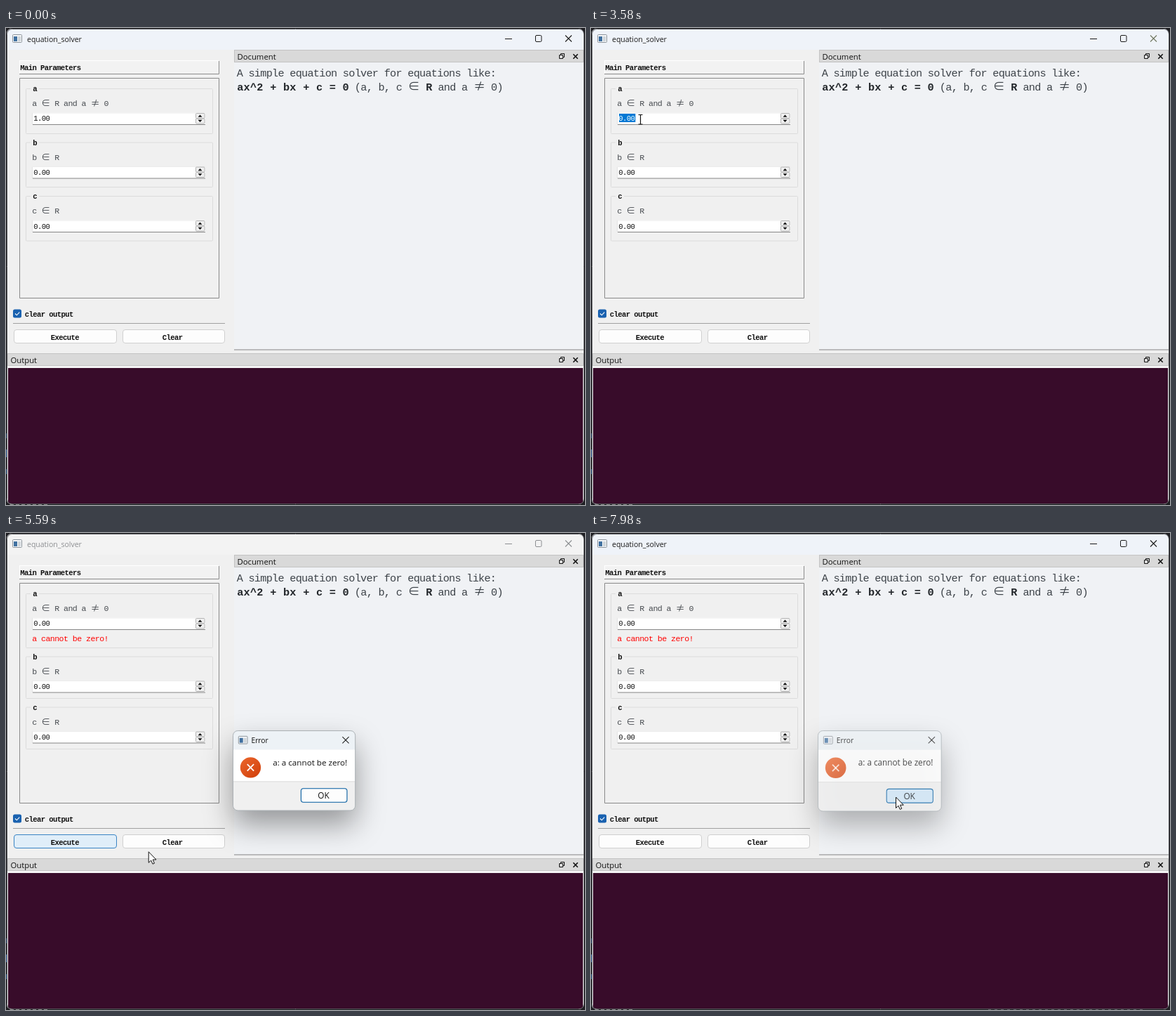
Animation of 825x679 px, one loop 8 s. Source, as an HTML page with a canvas:

```html
<!DOCTYPE html>
<html lang="en">
<head>
<meta charset="utf-8">
<title>equation_solver</title>
<style>
html, body { margin: 0; width: 100%; height: 100%; overflow: hidden; background: #1e1e22; }
canvas { display: block; }
</style>
</head>
<body>
<canvas id="stage" width="825" height="679"></canvas>
<script>
const ctx = document.getElementById('stage').getContext('2d');
const LOOP = 8000, TICK = 68.2;
const MONO = '"Liberation Mono", monospace';
const WIDE = '"Noto Sans CJK SC", "Noto Sans CJK JP", "DejaVu Sans", sans-serif';
const SANS = '"Open Sans", "Noto Sans", sans-serif';
const INK = '#111', LABEL = '#474b50', BLUE = '#0078d4';

// Pointer stops: time, x, y
const PATH = [
  [70, 215, 600], [400, 195, 328], [510, 178, 265], [820, 70, 130],
  [4170, 70, 130], [4540, 88, 290], [4920, 110, 445],
  [5450, 110, 445], [5590, 203, 454], [5930, 236, 423],
  [6200, 320, 401], [6480, 410, 376], [6750, 452, 371], [6820, 434.5, 376]
];

const CLICKS = [[885, 1035], [1095, 1295], [1360, 1490], [5175, 5445], [7015, 7905]];

const within = (t, a, b) => t >= a && t < b;
const clamp = v => Math.max(0, Math.min(1, v));

function fill(x, y, w, h, color) {
  ctx.fillStyle = color;
  ctx.fillRect(x, y, w, h);
}

function box(x, y, w, h, r, bg, edge, lw = 1) {
  ctx.beginPath();
  ctx.roundRect(x, y, w, h, r);
  if (bg) { ctx.fillStyle = bg; ctx.fill(); }
  if (edge) { ctx.strokeStyle = edge; ctx.lineWidth = lw; ctx.stroke(); }
}

function line(points, color, lw = 1) {
  ctx.beginPath();
  for (let i = 0; i < points.length; i += 2) ctx.lineTo(points[i], points[i + 1]);
  ctx.strokeStyle = color;
  ctx.lineWidth = lw;
  ctx.stroke();
}

function poly(points, color) {
  ctx.beginPath();
  for (let i = 0; i < points.length; i += 2) ctx.lineTo(points[i], points[i + 1]);
  ctx.closePath();
  ctx.fillStyle = color;
  ctx.fill();
}

function cross(x, y, r, color, lw) {
  line([x - r, y - r, x + r, y + r], color, lw);
  line([x - r, y + r, x + r, y - r], color, lw);
}

function sans(text, x, y, size, color) {
  ctx.font = `${size}px ${SANS}`;
  ctx.textAlign = 'left';
  ctx.fillStyle = color;
  ctx.fillText(text, x, y);
}

// Fixed-pitch text; math signs take two cells. Returns the end x.
function mono(text, x, y, size, pitch, color, weight = 'normal') {
  ctx.textAlign = 'center';
  ctx.fillStyle = color;
  for (const ch of text) {
    const wide = ch > '\u00ff';
    const w = wide ? pitch * 2 : pitch;
    ctx.font = wide ? `300 ${w}px ${WIDE}` : `${weight} ${size}px ${MONO}`;
    ctx.fillText(ch, x + w / 2, y);
    x += w;
  }
  return x;
}

const small = (text, x, y, color = INK, weight) => mono(text, x, y, 10.6, 5.75, color, weight);
const heading = (text, x, y) => small(text, x, y, INK, 'bold');
const label = (text, x, y, color = LABEL) => mono(text, x, y, 11.6, 6.4, color);

function appIcon(x, y) {
  box(x + .5, y + .5, 13, 11, 1, '#f4f6f8', '#8d949b');
  fill(x + 2, y + 3, 5, 7, '#3f6f9f');
  fill(x + 8, y + 3, 4, 7, '#cfd5da');
}

function desktop(t) {
  fill(0, 0, 825, 679, '#1e1e22');
  fill(0, 577, 2, 7, '#3c5a80');
  fill(0, 600, 2, 11, '#5480bd');
  fill(0, 628, 2, 7, '#3c6a9c');
  for (let x = 6; x < 62; x += 8) fill(x, 678, 5, 1, '#858585');
  if (t > 5930) for (let x = 566; x < 790; x += 9) fill(x, 678, 4, 1, '#5b5560');
}

function titleBar(t) {
  const idle = within(t, 5500, 7905);
  const ink = idle ? '#8d8f92' : '#1a1a1a';
  const closeInk = idle ? ink : within(t, 70, 5500) ? '#6f755f' : ink;
  fill(1, 1, 822, 30, idle ? '#f3f3f3' : '#eff3f9');
  appIcon(9, 9);
  sans('equation_solver', 30, 20, 10.5, ink);
  line([711, 15.5, 721, 15.5], ink);
  box(754.5, 10.5, 8.5, 9, 1.5, null, ink);
  cross(801.5, 15, 4.5, closeInk, 1.1);
}

function dockTitle(text, x, y, w) {
  fill(x, y, w, 18, '#d9d9d9');
  ctx.strokeStyle = '#c3c3c3';
  ctx.lineWidth = 1;
  ctx.strokeRect(x + .5, y + .5, w - 1, 17);
  sans(text, x + 4.5, y + 14, 11.3, INK);
  box(790.5, y + 5.5, 5, 5, 0, null, INK);
  box(788.5, y + 7.5, 5, 5, 0, '#d9d9d9', INK);
  cross(811.5, y + 9.5, 3.2, INK, 1.6);
}

function documentPane() {
  dockTitle('Document', 325, 31, 498);
  fill(325, 49, 498, 409, '#f0f2f5');
  fill(325, 457.5, 498, 1, '#858585');
  const ink = '#3c4248';
  const text = (s, x, y) => mono(s, x, y, 15.2, 8.4, ink);
  const bold = (s, x, y) => mono(s, x, y, 15.2, 9.4, '#22262a', 'bold');
  text('A simple equation solver for equations like:', 329, 69);
  let x = bold('ax^2 + bx + c = 0', 329, 89);
  x = text(' (a, b, c ∈ ', x, 89);
  x = bold('R', x, 89);
  text(' and a ≠ 0)', x, 89);
}

function spinBox(y, edge) {
  fill(37, y, 247, 17, '#fff');
  line([37.5, y, 37.5, y + 17], '#e2e2e2');
  line([37, y + .5, 284, y + .5], '#ececec');
  fill(38, y + 16.5, 246, 1, edge);
  for (const top of [y + .5, y + 8]) box(270.5, top + .5, 12.5, 7, 1, '#f0f0f0', '#b4b4b4');
  poly([273.5, y + 6.3, 279.5, y + 6.3, 276.5, y + 3], INK);
  poly([273.5, y + 10.2, 279.5, y + 10.2, 276.5, y + 13.5], INK);
}

function group(name, hint, y, h, edge = '#868686') {
  box(28.5, y - .5, 266, h, 1, null, '#dcdcdc');
  fill(35, y - 3, 12, 6, '#f0f0f0');
  heading(name, 38.5, y + 3);
  label(hint, 37.5, y + 24);
  spinBox(y + 33.5, edge);
}

const value = (text, y, color) => small(text, 39.5, y, color);

function select(from) {
  fill(from, 122, 63.3 - from, 12, BLUE);
}

function firstValue(t) {
  if (within(t, 1150, 1360)) {
    select(51.5);
    value('1.', 132);
    small('00', 51, 132, '#fff');
  } else if (within(t, 1360, 2225)) {
    select(40);
    value('1.00', 132, '#fff');
    if (t < 2025) fill(63, 122, 1, 12, INK);
  } else if (within(t, 2225, 3575)) {
    value('0', 132);
    if (t < 2755 || t >= 3305) fill(46, 122, 1, 12, INK);
  } else if (within(t, 3575, 5175)) {
    select(40);
    value('0.00', 132, '#fff');
  } else {
    value(t < 2000 ? '1.00' : '0.00', 132);
  }
}

function button(text, x, w, textX, bg = '#fdfdfd', edge = '#d0d0d0') {
  box(x + .5, 429.5, w - 1, 19, 3.5, bg, edge);
  heading(text, textX, 443.5);
}

function executeButton(t) {
  let bg, edge;
  if (within(t, 5175, 5445)) [bg, edge] = ['#cce4f7', '#1c6aa8'];
  else if (within(t, 4840, 5640)) [bg, edge] = ['#e0eef9', '#3a85c4'];
  button('Execute', 11, 147, 64, bg, edge);
}

function sidePanel(t) {
  const failed = t >= 5500;
  fill(19, 47, 285, 19, '#f2f2f2');
  line([19, 46.5, 303, 46.5], '#fff');
  line([19.5, 47, 19.5, 65], '#fff');
  line([19, 65.5, 303.5, 65.5, 303.5, 47], '#8c8c8c');
  heading('Main Parameters', 20.5, 60);
  box(19.5, 71.5, 284, 313, 0, '#f0f0f0', '#8a8a8a');

  const yB = failed ? 176.5 : 163.5, yC = failed ? 248.5 : 240;
  const h = failed ? 59.5 : 63.5;
  group('a', 'a ∈ R and a ≠ 0', 87, failed ? 77 : 64, within(t, 4230, 5450) ? '#2f76b0' : '#868686');
  group('b', 'b ∈ R', yB, h);
  group('c', 'c ∈ R', yC, h);
  firstValue(t);
  value('0.00', yB + 45.5);
  value('0.00', yC + 45.5);
  if (failed) label('a cannot be zero!', 37.5, 153.5, '#ff0000');

  box(10, 400.5, 12, 12, 2.5, '#1a62b0');
  line([13, 406.5, 15.3, 408.8, 19.2, 404.6], '#fff', 1.1);
  heading('clear output', 27, 411);
  fill(10, 420, 302, 1, '#a0a0a0');
  executeButton(t);
  button('Clear', 166, 146, 223);
}

function outputPane() {
  dockTitle('Output', 2, 463, 821);
  fill(2, 481, 821, 197, '#f4f4f4');
  fill(3, 484, 819, 193, '#380c2a');
}

function dialog(t) {
  if (t < 5515) return;
  const opening = clamp((t - 5515) / 210);
  const closing = clamp((t - 7840) / 280);
  const scale = t < 7000 ? .958 + .042 * (1 - (1 - opening) ** 1.5) : 1 - .026 * closing;
  const active = t > 5640 && t < 7905;

  ctx.save();
  ctx.translate(323, 281);
  ctx.scale(scale, scale);
  ctx.translate(-323, -281);
  ctx.globalAlpha = t < 7000 ? clamp(.4 + opening * 1.8) : 1 - (t >= 7905 ? .5 * closing : 0);

  ctx.save();
  ctx.shadowColor = 'rgba(0,0,0,.38)';
  ctx.shadowBlur = 42;
  ctx.shadowOffsetY = 20;
  box(323.5, 281.5, 178, 116, 7, '#f0f0f0');
  ctx.restore();

  ctx.save();
  ctx.beginPath();
  ctx.roundRect(323.5, 281.5, 178, 116, 7);
  ctx.clip();
  fill(323, 281, 179, 28, active ? '#e8f4f9' : '#edf2f6');
  fill(323, 309, 179, 46, '#fff');
  fill(323, 355, 179, 43, '#f0f0f0');
  fill(323, 355, 179, 1, '#dfdfdf');
  ctx.restore();
  box(323.5, 281.5, 178, 116, 7, null, '#a9b0b4');

  appIcon(331, 289);
  sans('Error', 350, 299, 10.5, INK);
  cross(487.5, 295, 4.7, '#222', 1.1);

  const disc = ctx.createLinearGradient(338, 322, 360, 348);
  disc.addColorStop(0, '#e8632a');
  disc.addColorStop(1, '#d3420c');
  ctx.beginPath();
  ctx.arc(349, 335, 15, 0, Math.PI * 2);
  ctx.fillStyle = disc;
  ctx.fill();
  cross(349, 335, 4.8, '#fff', 1.8);
  sans('a: a cannot be zero!', 381.5, 332, 11.9, INK);

  const bg = t >= 7015 ? '#cce4f7' : t >= 6540 ? '#e0eef9' : '#fdfdfd';
  box(422.5, 365.5, 67, 20, 3.5, bg, '#005a9e', 1.1);
  sans('OK', 447, 380, 12, INK);
  ctx.restore();
}

function pointerAt(t) {
  let i = 0;
  while (i < PATH.length - 1 && PATH[i + 1][0] <= t) i++;
  const a = PATH[i], b = PATH[Math.min(i + 1, PATH.length - 1)];
  const k = b === a ? 0 : clamp((t - a[0]) / (b[0] - a[0]));
  return [a[1] + (b[1] - a[1]) * k, a[2] + (b[2] - a[2]) * k];
}

function pointer(t) {
  if (t < 66) return;
  const [x, y] = pointerAt(Math.floor((t + 4) / TICK) * TICK);
  if (CLICKS.some(([a, b]) => within(t, a, b))) {
    ctx.save();
    ctx.globalCompositeOperation = 'multiply';
    ctx.beginPath();
    ctx.arc(x, y - 1, 10.8, 0, Math.PI * 2);
    ctx.fillStyle = '#f6f268';
    ctx.fill();
    ctx.restore();
  }
  ctx.save();
  ctx.translate(x, y);
  if (x > 37 && x < 270 && y > 120 && y < 138) {
    line([-2.5, -6.5, 3.5, -6.5], INK);
    line([.5, -6.5, .5, 7], INK, 1.2);
    line([-2.5, 7, 3.5, 7], INK);
  } else {
    const arrow = [0, 0, 0, 15.5, 3.5, 12.2, 5.8, 17.4, 8.2, 16.4, 6, 11.2, 10.8, 11.2];
    poly(arrow, '#fff');
    line([...arrow, 0, 0], INK);
  }
  ctx.restore();
}

function draw(t) {
  ctx.clearRect(0, 0, 825, 679);
  desktop(t);
  ctx.save();
  ctx.beginPath();
  ctx.roundRect(1, 1, 822, 677, 7);
  ctx.clip();
  fill(1, 1, 822, 677, '#f0f0f0');
  titleBar(t);
  sidePanel(t);
  documentPane();
  outputPane();
  ctx.restore();
  box(1.5, 1.5, 822, 676, 7, null, '#55565a');
  dialog(t);
  pointer(t);
}

const start = performance.now();
function frame() {
  draw((performance.now() - start) % LOOP);
  requestAnimationFrame(frame);
}
frame();
</script>
</body>
</html>
```
